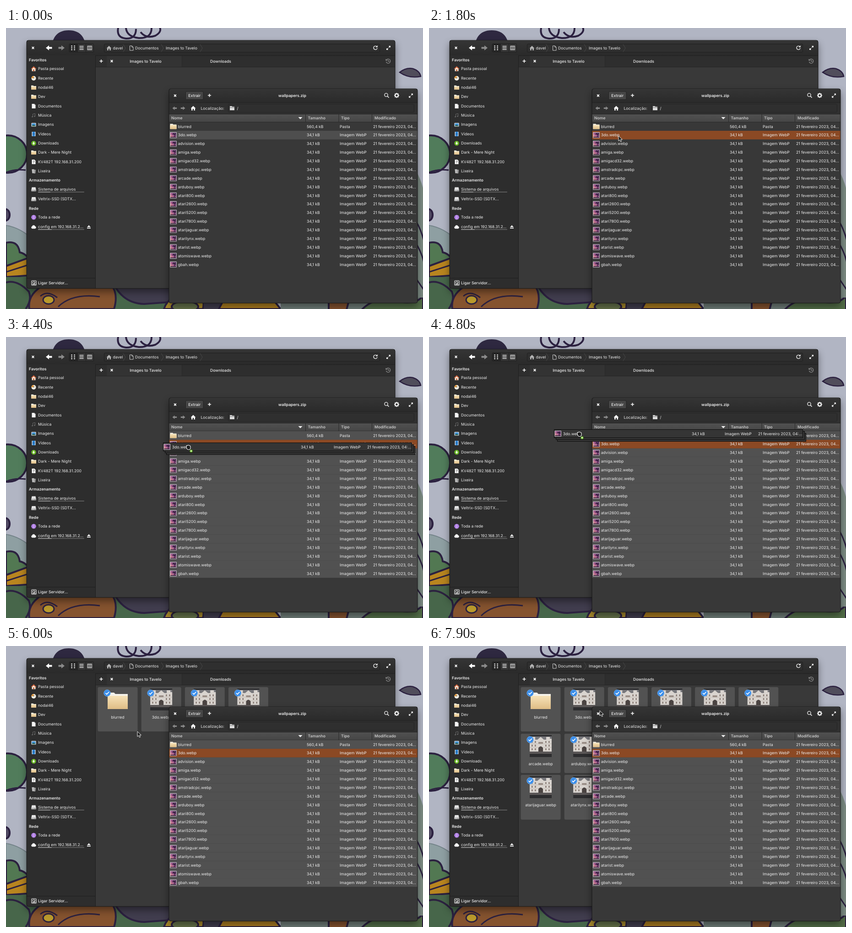
An HTML page for the animation above (8000 ms loop, 911 px wide and 615 px high).

```html
<!DOCTYPE html>
<html lang="pt">
<head>
<meta charset="utf-8">
<title>Arrastar arquivos</title>
<style>
html, body { margin: 0; width: 100%; height: 100%; overflow: hidden; background: #b1b5c3; }
svg { display: block; width: 100vw; height: 100vh; }
text { font-family: Inter, "Open Sans", sans-serif; font-size: 8.62px; fill: #eee; text-rendering: geometricPrecision; white-space: pre; }
.bold { font-weight: 600; }
.mid { text-anchor: middle; }
.win { filter: drop-shadow(0 8px 8px #0006); }
</style>
</head>
<body>
<svg id="stage" viewBox="0 0 911 615">
  <defs>
    <linearGradient id="bar" x2="0" y2="1"><stop stop-color="#353535"/><stop offset="1" stop-color="#2a2a2a"/></linearGradient>
    <linearGradient id="head" x2="0" y2="1"><stop stop-color="#515151"/><stop offset="1" stop-color="#464646"/></linearGradient>
    <linearGradient id="dusk" x1="1" x2="0" y2="1"><stop stop-color="#46305c"/><stop offset=".5" stop-color="#a2588f"/><stop offset="1" stop-color="#f0a891"/></linearGradient>
    <linearGradient id="tan" x2="0" y2="1"><stop stop-color="#f6e2b8"/><stop offset="1" stop-color="#dfbd85"/></linearGradient>
    <clipPath id="clip1"><rect x="45" y="27" width="805" height="543" rx="4"/></clipPath>
    <clipPath id="clip2"><rect x="356" y="133" width="543" height="469" rx="4"/></clipPath>
  </defs>
</svg>
<script>
const stage = document.getElementById('stage');
const LOOP = 8000, ROW = 18.875;

const rect = (x, y, w, h, fill, extra = '') => `<rect x="${x}" y="${y}" width="${w}" height="${h}" fill="${fill}" ${extra}/>`;
const circle = (x, y, r, fill, extra = '') => `<circle cx="${x}" cy="${y}" r="${r}" fill="${fill}" ${extra}/>`;
const oval = (x, y, rx, ry, fill, extra = '') => `<ellipse cx="${x}" cy="${y}" rx="${rx}" ry="${ry}" fill="${fill}" ${extra}/>`;
const shape = (d, fill, extra = '') => `<path d="${d}" fill="${fill}" ${extra}/>`;
const line = (d, color = '#eee', width = 1.3) => shape(d, 'none', `stroke="${color}" stroke-width="${width}"`);
// y is the vertical centre of the text
const text = (x, y, s, cls = '', extra = '') => `<text x="${x}" y="${y + 3.1}" class="${cls}" ${extra}>${s}</text>`;
const at = (x, y, markup) => `<g transform="translate(${x} ${y})">${markup}</g>`;
const group = (id, markup) => `<g id="${id}">${markup}</g>`;

// Icons are centred on 0,0
const icon = {
  close: line('M-2.3-2.3 2.3 2.3M2.3-2.3-2.3 2.3', '#fff', 1.7),
  plus: line('M-3.6 0H3.6M0-3.6V3.6', '#fff', 1.6),
  back: shape('M-7 0 0-5.5V-2H6.5V2H0V5.5Z', 'currentColor'),
  expand: line('M.8-.8 3.5-3.5M-.8.8-3.5 3.5', '#fff', 1.4) + shape('M.4-4.4H4.4V-.4ZM-.4 4.4H-4.4V.4Z', '#fff'),
  home: shape('M-5.5 .5 0-5 5.5 .5H4V5H1.3V1.5H-1.3V5H-4V.5Z', 'currentColor'),
  house: shape('M-4-1 0-5 4-1V5H-4Z', '#f2e7d8') + line('M-5 0 0-4.6 5 0', '#d9643a', 1.8) + rect(-1.3, 1, 2.6, 4, '#b4552f'),
  clock: circle(0, 0, 5, '#f4f0e4') + shape('M0 0V-5A5 5 0 0 0-5 0Z', '#f0a03c') + line('M-2.5-1.5 0 0 2-2', '#444', 1),
  folder: shape('M-5.5-4.5H-1L0-3.3H5.5V4.5H-5.5Z', '#f4efe0') + rect(-5.5, -2.3, 11, 6.8, 'url(#tan)', 'rx=".7"'),
  page: shape('M-4-5H1.5L4-2.5V5H-4Z', '#f5f5f5') + line('M1.5-5V-2.5H4', '#aaa', .7),
  music: line('M-2 3V-3L3-4V2', '#686868', 1) + circle(-3, 3, 1.3, '#686868') + circle(2, 2, 1.3, '#686868'),
  image: rect(-5, -3.8, 10, 8, '#f5f5f5', 'rx=".8"') + rect(-4, -2.8, 8, 6, '#3f91d5') + shape('M-4 3.2-1 0 1 2 2.5 1 4 3.2Z', '#315a35'),
  video: rect(-4, -5, 8, 10, '#dce8f4', 'rx=".8"') + rect(-2.6, -5, 5.2, 10, '#2d83d2') + line('M-2.6 0H2.6', '#174b80', 1),
  down: circle(0, 0, 5.2, '#68b723') + shape('M-3 0H-1.1V-3H1.1V0H3L0 3.2Z', '#fff'),
  unknown: shape('M-4-5H1.5L4-2.5V5H-4Z', '#f5f5f5') + line('M-1.4-1.3Q0-3.3 1.3-1.4 1.2 0 0 .6V1.6M0 2.4V3.4', '#333', 1),
  trash: shape('M-4-4H1V4.6H-3.2Z', '#ddd') + shape('M0-3H4.4L3.6 5H.5Z', '#aaa') + line('M-2.3-3V4M-.6-3V4M2-2V4', '#777', .6),
  disk: shape('M-4-4.3H4L5.3 2H-5.3Z', '#e3e3e3') + rect(-5.3, 1.3, 10.6, 3.3, '#b9b9b9', 'rx=".7"') + rect(2, 2.5, 2, 1, '#666'),
  globe: circle(0, 0, 5.3, '#a56de2') + line('M-5 0H5M0-5V5M-3.6-3.6Q0-1 3.6-3.6M-3.6 3.6Q0 1 3.6 3.6', '#e5d2f7', .7),
  cloud: shape('M-3 4A2.8 2.8 0 0 1-3.4-1.4 3.4 3.4 0 0 1 3-1.5 2.8 2.8 0 0 1 3 4Z', '#f5f5f5'),
  server: rect(-5, -5, 10, 10, 'none', 'rx="1" stroke="#eee" stroke-width="1.2"') + circle(0, -.8, 2.7, 'none', 'stroke="#eee"') + line('M-3.5 3.3H3.5M0-.8 2 1'),
  dusk: rect(-7.2, -6.3, 14.4, 12.6, '#e6dde6') + rect(-6.3, -5.4, 12.6, 10.8, 'url(#dusk)') +
    line('M2.5 5Q3.2 1 2-1.6M2-1.6Q0-3-2-1M2-1.6Q1-4-1-4M2-1.6Q4-4.5 6-3M2-1.6Q5-1.5 5.5 1', '#2a1a35', 1.2) + rect(-6.3, 3.6, 12.6, 1.8, '#35213c')
};
const put = (name, x, y, color = '#fff', scale = 1, flip = 1) =>
  `<g transform="translate(${x} ${y}) scale(${scale * flip} ${scale})" color="${color}">${icon[name]}</g>`;

const systems = ['3do', 'advision', 'amiga', 'amigacd32', 'amstradcpc', 'arcade', 'arduboy', 'atari800', 'atari2600',
  'atari5200', 'atari7800', 'atarijaguar', 'atarilynx', 'atarist', 'atomiswave', 'gbah'];
const files = ['blurred', ...systems.map(s => s + '.webp')];

function wallpaper() {
  const ink = 'stroke="#2c2140" stroke-width="4"';
  return rect(0, 0, 911, 615, '#b1b5c3') +
    shape('M99 60Q96 5 137 5T175 60Z', '#2e2840') +
    line('M245 0Q241 21 262 23 284 24 284 2M262 0Q264 19 290 22 318 23 318 0M294 9Q306 24 326 17 342 8 335-3', '#2c2140', 4) +
    shape('M860 97Q874 86 889 89 904 94 906 106 880 111 860 97Z', '#504d5b', 'stroke="#2c2140" stroke-width="2.5"') +
    oval(4, 276, 42, 41, '#517c5b', ink) + line('M0 316Q19 308 43 311', '#2c2140', 3) +
    oval(-2, 409, 10, 13, '#514a63', ink) +
    shape('M0 432Q32 437 60 464V615H0Z', '#8e9fa2', 'stroke="#748389" stroke-width="2"') +
    shape('M0 470Q26 464 30 491 44 493 60 517V560H0Z', '#527852', ink) +
    shape('M0 521 60 499V541L0 545Z', '#b8851f', ink) + line('M0 534 50 518', '#2c2140', 3) +
    shape('M0 545H356V615H0Z', '#47664a') + line('M0 557Q24 550 50 577 57 595 43 615', '#2c2140', 4) +
    shape('M51 615Q46 582 84 562H230Q246 582 236 615Z', '#85532f', ink) +
    oval(93, 595, 12, 9, '#b9992c', 'stroke="#2c2140" stroke-width="3"') + line('M75 587Q90 573 112 590M114 610Q145 580 205 588', '#2c2140', 3) +
    shape('M236 562H358V600L302 604Q258 603 236 562Z', '#413d4e', ink) +
    shape('M345 615Q356 580 405 582 438 588 430 615Z', '#a88a2c', ink) + oval(391, 610, 29, 12, '#66734b', ink) +
    shape('M432 615V590H470V615Z', '#413d4e') + shape('M465 615 478 590H580L600 615Z', '#ad7e20', ink) +
    shape('M600 615V590H911V615Z', '#6f7d78') + shape('M705 620V590H751L743 620Z', '#85532f', ink) +
    shape('M774 620Q804 586 850 597T911 586V620Z', '#536e48', ink) +
    shape('M892 305Q906 330 911 350V590H892Z', '#7c8b83') +
    line('M897 425Q907 442 914 470M895 470Q910 494 914 520M897 550 914 575', '#2c2140', 3);
}

function sidebar() {
  const places = [['house', 'Pasta pessoal'], ['clock', 'Recente'], ['folder', 'nodal46'], ['folder', 'Dev'], ['page', 'Documentos'],
    ['music', 'Música'], ['image', 'Imagens'], ['video', 'Vídeos'], ['down', 'Downloads'], ['folder', 'Dark - Mere Night'],
    ['unknown', 'KV482T 192.168.31.200'], ['trash', 'Lixeira']];
  const entry = (name, label, y) => put(name, 60.5, y + .3) + text(70, y, label);
  const usage = (y, used) => rect(70, y, 101, 2, '#5b5b5b', 'rx="1"') + rect(70, y, used, 2, '#8c8c8c', 'rx="1"');
  return rect(45, 60, 150, 510, '#2d2d2d') + rect(195, 60, 1, 510, '#1f1f1f') +
    text(50, 69.5, 'Favoritos', 'bold') + places.map(([n, s], i) => entry(n, s, 89.3 + i * 20.33)).join('') +
    text(50, 333, 'Armazenamento', 'bold') + entry('disk', 'Sistema de arquivos', 352.5) + usage(358, 27) +
    entry('disk', 'Veltrix-SSD (SDTX…', 374) +
    text(50, 395, 'Rede', 'bold') + entry('globe', 'Toda a rede', 414) +
    entry('cloud', 'config em 192.168.31.2…', 435) + usage(440, 30) +
    shape('M177 436 181 431.5 185 436ZM177 437.2H185V439H177Z', '#eee') +
    rect(45, 547, 150, 1, '#1f1f1f') + put('server', 61, 558) + text(70, 558, 'Ligar Servidor…', '', 'font-weight="500"');
}

function thumbnail() {
  let windows = '';
  for (const x of [-20, -13, 10, 17]) for (const y of [-12, -4, 4]) windows += rect(x, y, 2.6, 4, '#8a7d76');
  return rect(-24, -25, 48, 48, '#2d2d2f') + rect(-24, -22, 48, 34, '#77777b') +
    shape('M-24 12V-17H-20V-21H-12V-15H-7L0-21 7-15H12V-21H20V-17H24V12Z', '#d9d4cf') + windows +
    line('M-24-6H24M-24 2H24', '#b9b0a9', .8) + rect(-5, -10, 10, 4, '#9b8f88') +
    shape('M-5 12V3Q0-4 5 3V12Z', '#4b4442') + rect(-24, 11, 48, 5, '#5b5757');
}

function tiles() {
  const tops = [90, 192, 282], heights = [97, 86, 98];
  return files.map((name, i) => {
    const row = Math.floor(i / 6), x = 200.5 + (i % 6) * 95.15, y = tops[row], mid = x + 43.5;
    const picture = i ? at(mid, y + 28, thumbnail())
      : shape('M222 138V102H236L239 105H266V138Z', '#f5f2ea') + rect(222, 109, 44, 29, 'url(#tan)', 'rx="1.5"');
    return `<g class="tile">${rect(x, y, 87, heights[row], '#525252', 'rx="3"')}${picture}` +
      circle(x + 20.5, y + 13, 7.2, '#3b8eea', 'stroke="#73b4f5" stroke-width=".8"') +
      line(`M${x + 17} ${y + 13}l2.6 2.7 4.8-5.2`, '#fff', 1.7) + text(mid, y + 66, name, 'mid') + '</g>';
  }).join('');
}

function fileManager() {
  let grid = '';
  for (const x of [143.2, 149.2]) for (const y of [39.5, 43.5, 47.5]) grid += rect(x - .9, y - 1.1, 2.6, 2.2, '#eee');
  const chevron = x => line(`M${x - 2} 35.5 ${x + 3} 44 ${x - 2} 52.5`, '#484848', 1);
  return rect(45, 27, 805, 543, '#393939') + rect(45, 27, 805, 33, 'url(#bar)') + rect(45, 27, 805, 1, '#505050') + rect(45, 60, 805, 1, '#202020') +
    put('close', 59, 43.5) + put('back', 94, 43.5) + put('back', 121, 43.5, '#8b8b8b', 1, -1) +
    rect(138, 34.5, 53.5, 18.5, '#353535', 'rx="2" stroke="#1e1e1e"') + rect(138.5, 35, 17.5, 17.5, '#242424') + grid +
    rect(156, 35, 1, 18, '#222') + rect(174, 35, 1, 18, '#222') +
    line('M160.5 40H169.5M160.5 43.5H169.5M160.5 47H169.5') + line('M178.2 39.5H187.2V47.8H178.2ZM181.2 39.5V48M184.2 39.5V48', '#eee', 1.1) +
    rect(214.5, 35, 602, 18, '#2f2f2f', 'rx="2" stroke="#1f1f1f"') +
    put('home', 225, 44, '#b5b5b5') + text(233.5, 44, 'davel') + chevron(258) +
    line('M270.5 39H275L278 42V49H270.5ZM275 39V42H278', '#ccc', 1) + text(282, 44, 'Documentos') + chevron(341) +
    text(349, 44, 'Images to Tavelo') + chevron(426) +
    line('M810.3 41A4 4 0 1 0 811 44', '#eee', 1.4) + shape('M807.5 42.3H811.7V38Z', '#eee') + put('expand', 835.5, 43.5) +
    rect(196, 61, 654, 24, '#2e2e2e') + rect(220, 61, 165, 24, '#333') + rect(384, 61, 1, 24, '#292929') + rect(196, 85, 654, 1, '#262626') +
    put('plus', 208, 72.5) + put('close', 231, 72.5) +
    text(305, 72.5, 'Images to Tavelo', 'mid', 'font-weight="500"') + text(469, 72.5, 'Downloads', 'mid', 'font-weight="500"') +
    line('M831 70A4.7 4.7 0 1 1 830.5 74M835 69.5V73H838M830 68V71H833', '#999', 1.1) + sidebar() + tiles();
}

const cells = (x, y, name, date) => text(x + 19.7, y, name) + text(x + 301, y, name === 'blurred' ? '560,4 kB' : '34,1 kB') +
  text(x + 373, y, name === 'blurred' ? 'Pasta' : 'Imagem WebP') + text(x + 446, y, date);

function archive() {
  const header = (x, s) => text(x, 197, s, 'bold', 'style="fill:#c9c9c9"');
  const rows = files.map((name, i) => {
    const y = 215.5 + i * ROW;
    return `<rect class="row" x="356" y="${y - 9.4}" width="543" height="${ROW}" fill="none"/>` +
      (i ? put('dusk', 365.5, y) : put('folder', 365.5, y, '', 1.28)) + cells(356, y, name, '21 fevereiro 2023, 04…');
  }).join('');
  let teeth = '';
  for (let i = 0; i < 8; i++) teeth += rect(-1.1, -5.5, 2.2, 3, '#eee', `transform="rotate(${i * 45})"`);
  return rect(356, 133, 543, 469, '#383838') + rect(356, 133, 543, 31, 'url(#bar)') + rect(356, 133, 543, 1, '#525252') +
    rect(356, 163, 543, 1, '#222') + rect(356, 164, 543, 24, '#303030') +
    put('close', 369.5, 148) + rect(392.5, 139, 38.5, 17.5, '#464646', 'id="extract" rx="2" stroke="#222"') +
    text(411.7, 148, 'Extrair', 'mid', 'font-weight="500"') + put('plus', 444.5, 147.5) + text(625.5, 148, 'wallpapers.zip', 'mid bold') +
    circle(830.5, 146.5, 3.6, 'none', 'stroke="#eee" stroke-width="1.4"') + line('M833 149 836.5 152.5', '#eee', 1.7) +
    at(853.5, 147.5, teeth + circle(0, 0, 3.3, 'none', 'stroke="#eee" stroke-width="2.2"')) + put('expand', 884.5, 148) +
    put('back', 368.5, 175.5, '#898989', .72) + put('back', 386.5, 175.5, '#898989', .72, -1) +
    put('home', 409, 175.5, '#fff') + text(425.5, 175.5, 'Localização:') +
    rect(485.5, 166.5, 406, 18, '#2f2f2f', 'rx="2" stroke="#242424"') +
    shape('M489 171H493.5L494.5 172.3H499V180H489Z', '#ddd') + line('M489 174H499', '#555', .8) + text(504.5, 175.5, '/') +
    rect(356, 188, 543, 18, 'url(#head)') + rect(356, 188, 543, 1, '#242424') + rect(356, 205.5, 543, 1, '#292929') +
    [654, 726.5, 799].map(x => rect(x, 188, 1, 18, '#292929')).join('') +
    header(361, 'Nome') + header(659.5, 'Tamanho') + header(732, 'Tipo') + header(805, 'Modificado') +
    shape('M638.5 195H647.5L643 199.7Z', '#eee') + rows;
}

const sheet = (dx, dy) => rect(dx + .5, dy + .5, 543, 18, '#353535', 'stroke="#0c0c0c"');
const win = (clip, x, y, w, h, content) =>
  `<g class="win"><g clip-path="url(#${clip})">${content}</g>${rect(x, y, w, h, 'none', 'rx="4" stroke="#171717"')}</g>`;

stage.insertAdjacentHTML('beforeend', wallpaper() +
  win('clip1', 45, 27, 805, 543, fileManager()) + win('clip2', 356, 133, 543, 469, archive()) +
  group('drag', sheet(7, 8) + sheet(4, 4) + sheet(0, 0) + put('dusk', 8.7, 9.5) + cells(0, 9.5, '3do.webp', '21 fevereiro 2023, 04:…')) +
  group('hand', shape('M-4.5-2Q-4-4.5-2-4 0-5.5 2-4 4.5-4 4.5-1V2Q4 5 1 5H-1Q-3 4-4.5 1Z', '#1d1d1d', 'stroke="#fff" stroke-width="1.1"') +
    group('badge', circle(6, 8, 3.1, '#62b51f') + line('M4.2 8H7.8M6 6.2V9.8', '#fff', 1))) +
  group('arrow', shape('M0 0V11.3L2.7 8.8 4.6 13 6.6 12.1 4.8 8H8.4Z', '#1d1d1d', 'stroke="#fff" stroke-width=".9" stroke-linejoin="round"')));

const $ = id => document.getElementById(id);
const rowBoxes = [...document.querySelectorAll('.row')], tileBoxes = [...document.querySelectorAll('.tile')];
const show = (el, on) => el.setAttribute('visibility', on ? 'inherit' : 'hidden');
const move = (el, [x, y]) => el.setAttribute('transform', `translate(${x} ${y})`);

// Keys are [time, x, y]
const pointerKeys = [[200, 438, -20], [300, 437, 3], [700, 426, 125], [1100, 415, 205], [1500, 414, 232], [1700, 414, 236],
  [5700, 414, 236], [5800, 287, 187], [6800, 287, 187], [7100, 312, 168], [7400, 352, 148], [7700, 379, 142], [7900, 373, 141.5]];
const dragKeys = [[4400, 343, 231], [4600, 303, 215], [4800, 273, 202], [5000, 257, 193], [5200, 244, 184], [5300, 230, 176]];

function along(keys, t) {
  const next = keys.findIndex(k => k[0] > t);
  if (next === 0) return keys[0].slice(1);
  if (next < 0) return keys[keys.length - 1].slice(1);
  const a = keys[next - 1], b = keys[next], f = (t - a[0]) / (b[0] - a[0]);
  return [a[1] + (b[1] - a[1]) * f, a[2] + (b[2] - a[2]) * f];
}

function draw(now) {
  const t = Math.floor(now % LOOP / 100) * 100;
  const pointer = along(pointerKeys, t), [left, top] = along(dragKeys, t);
  const grabbing = t >= 3800 && t < 5800, dragging = t >= 4400 && t < 5800;
  const hovered = t >= 1200 && pointer[1] < 225 ? 0 : 1;

  rowBoxes.forEach((box, i) => {
    const color = i === 1 && t >= 1800 ? '#8b4924' : t >= 3100 ? '#515151' : t < 1800 && i === hovered ? '#4e4e4e' : 'none';
    box.setAttribute('fill', color);
  });
  const overExtract = t < 1800 && pointer[1] > 138 && pointer[1] < 157 && pointer[0] < 431;
  $('extract').setAttribute('fill', overExtract ? '#565656' : '#464646');
  tileBoxes.forEach((tile, i) => show(tile, t >= 5900 + i * 30));

  show($('drag'), dragging);
  move($('drag'), [left, top]);
  show($('hand'), grabbing);
  show($('badge'), dragging);
  move($('hand'), dragging ? [left + 55.5, top + 10.5] : [416, 241]);
  show($('arrow'), t >= 300 && !grabbing);
  move($('arrow'), pointer);
}

const start = performance.now();
function tick() {
  draw(performance.now() - start);
  requestAnimationFrame(tick);
}
tick();
</script>
</body>
</html>
```
